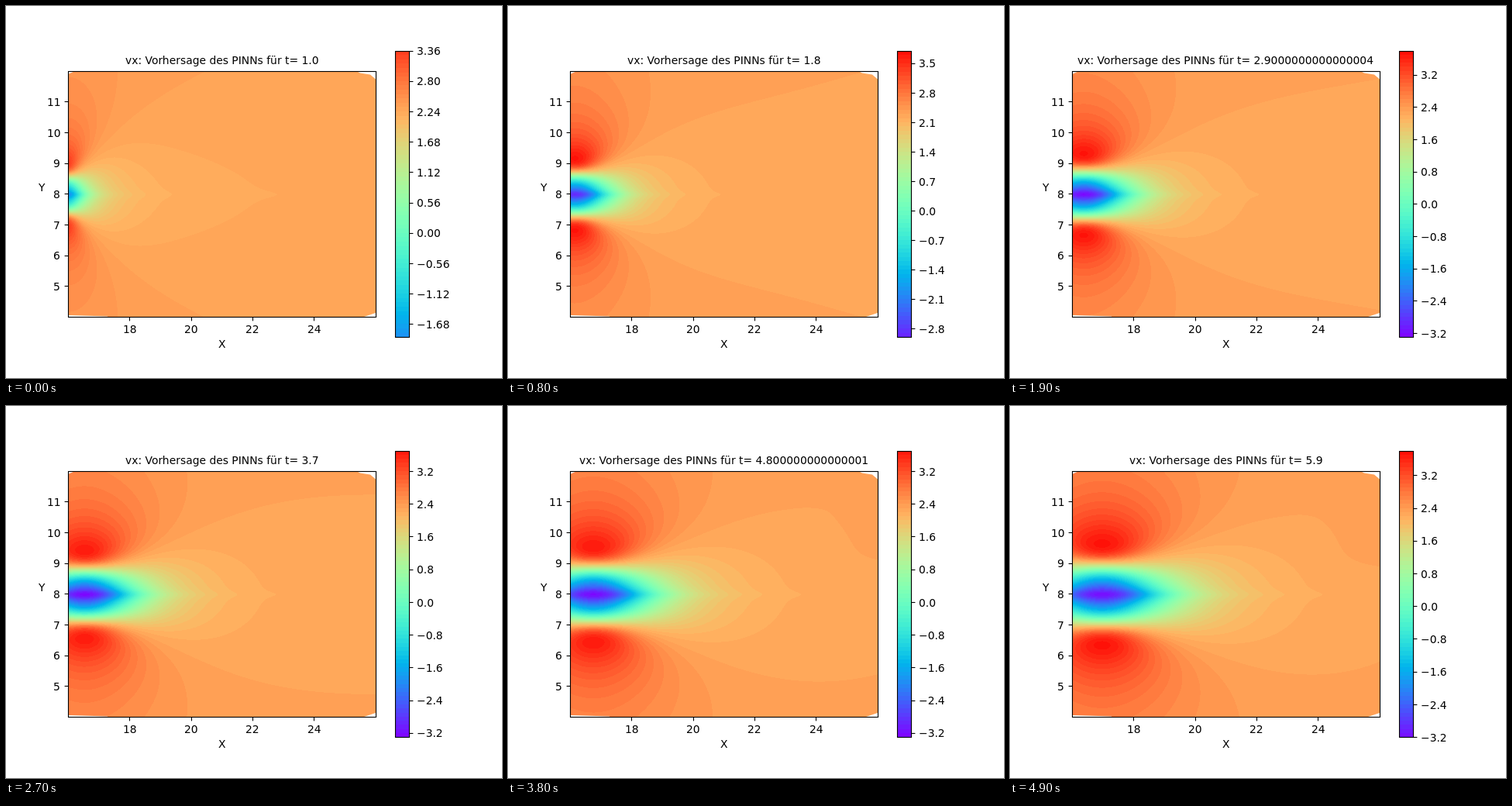
Recreate the animation shown at these times as an HTML page with a canvas. Size 640x480 px, loop 5 s.

```html
<!DOCTYPE html>
<html lang="de">
<head>
<meta charset="utf-8">
<title>vx</title>
<style>
html, body { margin: 0; width: 100%; height: 100%; overflow: hidden; background: #fff; }
canvas { display: block; }
</style>
</head>
<body>
<canvas id="c" width="640" height="480"></canvas>
<script>
const ctx = document.getElementById('c').getContext('2d');
const FRAMES = 50, STEP_MS = 100;
const UNIT = 39.68, LEFT = 80, BOTTOM = 401.12;
const W = 397, H = 317, TOP = 84;
const BAR = { x: 501.6, w: 18.5, top: 57.6, bottom: 427.2 };
const image = ctx.createImageData(W, H);

const clamp = (v, lo, hi) => Math.min(hi, Math.max(lo, v));

// The wake settles quickly, then lengthens and drifts downstream.
function paramsAt(t) {
  const u = t - 1;
  return {
    xc: 16 + 0.2 * u,
    high: 0.7 + 0.11 * u - 0.0057 * u * u,
    len: 0.55 + 0.82 * Math.sqrt(u),
    gain: 1 - Math.exp(-u / 0.5),
    min: -3.29 + 1.41 * Math.exp(-u / 0.6) + 0.005 * u * u,
    max: 3.7 + 0.04 * Math.cos((u - 1.22) * 2 * Math.PI / 3.9) - 0.36 * Math.exp(-u / 0.2),
    base: 2.267 + 0.012 * u,
    rise: 0.09 * Math.exp(-u / 2.4),
    bump: 0.08 * clamp((t - 4.5) / 0.9, 0, 1)
  };
}

function rainbow(value) {
  const x = clamp((value + 3.3) / 7.2, 0, 1);
  return [Math.min(1, Math.abs(2 * x - 0.5)), Math.sin(Math.PI * x), Math.cos(Math.PI * x / 2)]
    .map(v => Math.round(255 * v));
}

function makeLevels(p) {
  const step = (p.max - p.min) / 71 <= 0.08 ? 0.08 : 0.1;
  const lo = Math.floor(p.min / step), hi = Math.ceil(p.max / step);
  const colors = [];
  for (let i = lo; i < hi; i++) colors.push(rainbow((i + 0.5) * step));
  return { step, lo, hi, colors };
}

// Regularised vortex pair in stretched coordinates over a slow wake.
function drawField(p, lv) {
  const data = image.data, last = lv.colors.length - 1;
  const down = p.base - p.min, up = (p.max - p.base - p.rise * 0.45) / 0.2556;
  for (let i = 0; i < W; i++) {
    const x = 16 + (i + 0.5) / UNIT, dx2 = (x - p.xc) ** 2;
    const r = Math.sqrt(dx2) / p.len;
    const grow = p.gain * r * r / (1.3 + 0.4 * r);
    const q = 1 + r * r * (1 + grow);
    const sy = (1 + 0.6 * grow) / (p.high * p.high);
    const edge = p.bump * Math.exp(-(((x - 26) / 1.2) ** 2));
    for (let j = 0; j < H; j++) {
      const y = 4 + (BOTTOM - TOP - j - 0.5) / UNIT;
      const y2 = (y - 7.98) ** 2, s = y2 * sy;
      const f = (s - q) / ((s + q) ** 2 - 2.52 * s);
      const scale = f < 0 ? down * (1 - 0.23 * s / (s + 0.05)) : up;
      let v = p.base + f * scale + p.rise * y2 / (y2 + 1.5 + 0.25 * dx2);
      if (edge > 0.001) v += edge * Math.exp(-(((y - 9.9) / 0.9) ** 4));
      const c = lv.colors[clamp(Math.floor(v / lv.step) - lv.lo, 0, last)];
      const o = 4 * (j * W + i);
      data[o] = c[0]; data[o + 1] = c[1]; data[o + 2] = c[2]; data[o + 3] = 255;
    }
  }
  ctx.putImageData(image, LEFT, TOP);
}

function blank(...points) {
  ctx.fillStyle = '#fff';
  ctx.beginPath();
  points.forEach(([x, y]) => ctx.lineTo(x, y));
  ctx.fill();
}

function line(x1, y1, x2, y2) {
  ctx.beginPath();
  ctx.moveTo(x1, y1);
  ctx.lineTo(x2, y2);
  ctx.stroke();
}

// Text starts on whole pixels; align is the share of its width left of x.
function label(text, x, y, align) {
  ctx.fillText(text, Math.round(x - align * ctx.measureText(text).width), y);
}

const snap = v => Math.round(v) + 0.5;
const baseline = v => Math.ceil(v + 5.06);

function drawAxes(title) {
  blank([452, 84], [457, 86.5], [470, 88.5], [477, 94.5], [478, 84]);
  blank([459, 402], [477, 396], [478, 402]);
  blank([80, 399], [131, 400.6], [132, 402], [80, 402]);
  blank([80, 84], [89, 84], [80, 88]);
  ctx.fillStyle = '#000';
  ctx.strokeRect(80.5, 84.5, 397, 317);
  for (let x = 18; x <= 24; x += 2) {
    const px = LEFT + (x - 16) * UNIT;
    line(snap(px), 401.5, snap(px), 406.4);
    label(x, px, 422, 0.5);
  }
  for (let y = 5; y <= 11; y++) {
    const py = BOTTOM - (y - 4) * UNIT;
    line(75.6, snap(py), 80.5, snap(py));
    label(y, 70.3, baseline(py), 1);
  }
  label('X', 278.4, 441, 0.5);
  label('Y', 46, 239, 0.5);
  label(title, 278.4, 75, 0.5);
}

function drawBar(lv) {
  const { x, w, top, bottom } = BAR;
  const size = (bottom - top) / (lv.hi - lv.lo);
  const yOf = i => bottom - (i - lv.lo) * size;
  lv.colors.forEach((c, k) => {
    const y1 = Math.round(yOf(lv.lo + k + 1)), y2 = Math.round(yOf(lv.lo + k));
    ctx.fillStyle = `rgb(${c})`;
    ctx.fillRect(502, y1, 18, y2 - y1);
  });
  ctx.strokeRect(502.5, 58.5, 18, 369);
  ctx.fillStyle = '#000';
  const every = Math.ceil((lv.hi - lv.lo + 1) / 10);
  const digits = lv.step < 0.1 ? 2 : 1;
  for (let i = Math.ceil(lv.lo / every) * every; i <= lv.hi; i += every) {
    const y = yOf(i);
    line(520.5, snap(y), 525.4, snap(y));
    const text = Math.abs(i * lv.step).toFixed(digits);
    label((i < 0 ? '\u2212' : '') + text, x + w + 9.7, baseline(y), 0);
  }
}

function draw(index) {
  const n = 10 + index, t = n * 0.1;
  const p = paramsAt(n / 10), lv = makeLevels(p);
  ctx.fillStyle = '#fff';
  ctx.fillRect(0, 0, 640, 480);
  ctx.font = '13.89px "DejaVu Sans", sans-serif';
  ctx.strokeStyle = '#000';
  ctx.lineWidth = 1.11;
  drawField(p, lv);
  drawAxes('vx: Vorhersage des PINNs für t= ' + (Number.isInteger(t) ? t.toFixed(1) : t));
  drawBar(lv);
}

let shown = -1;
const start = performance.now();
function tick() {
  const index = Math.floor((performance.now() - start) / STEP_MS) % FRAMES;
  if (index !== shown) draw(shown = index);
  requestAnimationFrame(tick);
}
tick();
</script>
</body>
</html>
```
